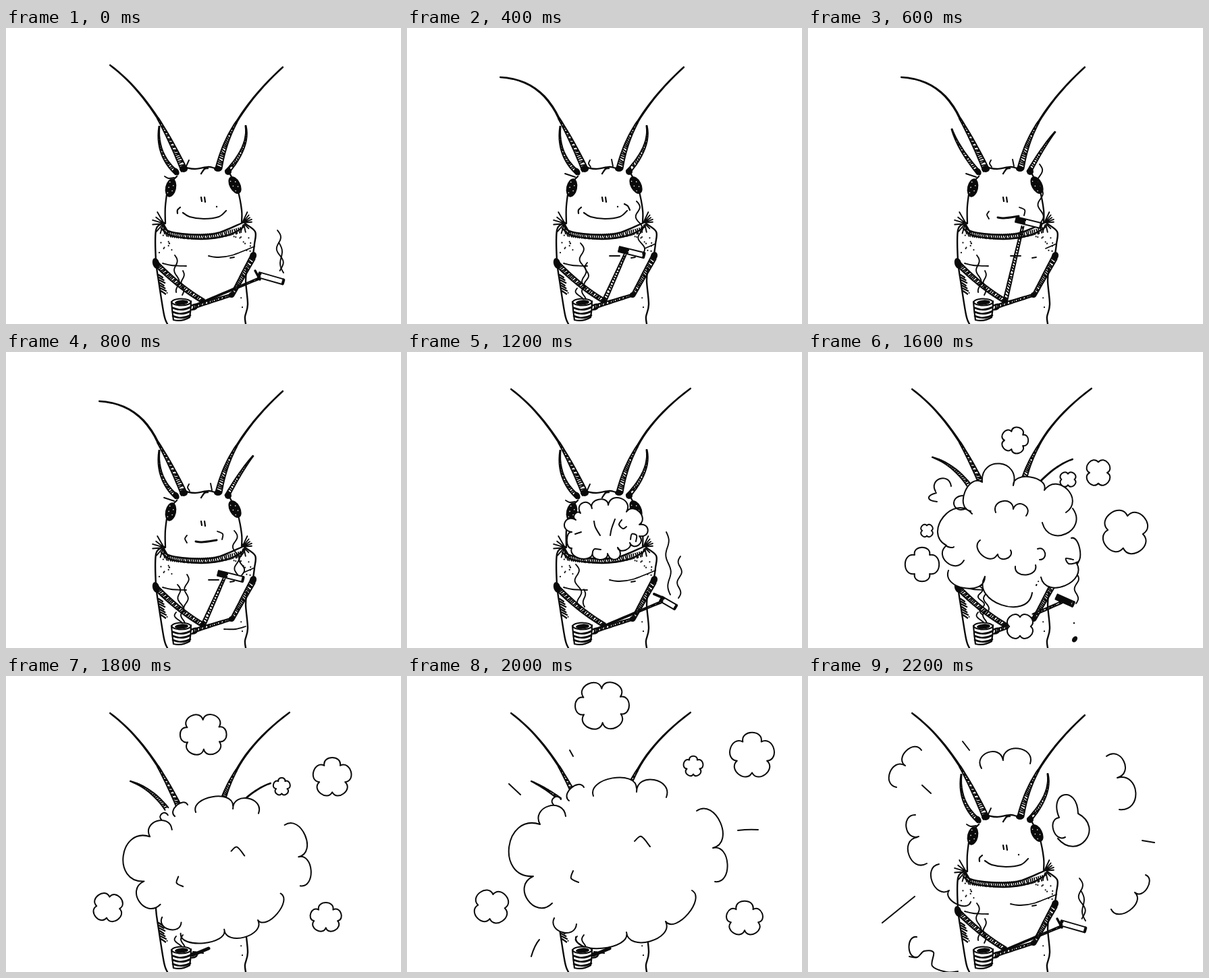
An HTML page for the animation above (2400 ms loop, 585 px wide and 439 px high).

```html
<!DOCTYPE html>
<html lang="en">
<head>
<meta charset="utf-8">
<title>Smoking bug</title>
<style>
  html, body { margin: 0; width: 100%; height: 100%; overflow: hidden; background: #fff; }
  svg { display: block; width: 585px; height: 439px; }
  path { fill: none; stroke: #0a0a0a; stroke-linecap: round; stroke-linejoin: round; vector-effect: non-scaling-stroke; }
  .paper { fill: #fff; stroke: none; }
</style>
</head>
<body>
<svg id="stage" viewBox="0 0 585 439"></svg>
<script>
const STEP = 200;

let seed = 7;
const random = () => (seed = seed * 16807 % 2147483647) / 2147483647;
const range = n => Array.from({ length: n }, (_, i) => i);

// "x,y x,y / x,y ..." -> strokes made of points
const parse = text => text.split('/').map(s => s.trim().split(/\s+/).map(p => p.split(',').map(Number)));
const path = (d, w = 2.2) => `<path d="${d}" stroke-width="${w}"/>`;
const trace = pts => 'M' + pts.map(p => p.map(v => v.toFixed(1))).join('L');
const put = (transform, art) => `<g transform="${transform}">${art}</g>`;
const zoom = (k, x, y, art) => put(`translate(${x} ${y}) scale(${k}) translate(${-x} ${-y})`, art);
const blob = (x, y, rx, ry = rx, turn = 0) =>
  `<ellipse fill="#0a0a0a" cx="${x}" cy="${y}" rx="${rx}" ry="${ry}" transform="rotate(${turn} ${x} ${y})"/>`;

// Smooth curve through every point
function curve(pts) {
  let d = 'M' + pts[0];
  for (let i = 0; i < pts.length - 1; i++) {
    const a = pts[i], b = pts[i + 1], before = pts[i - 1] || a, after = pts[i + 2] || b;
    const c1 = a.map((v, k) => v + (b[k] - before[k]) / 6);
    const c2 = b.map((v, k) => v - (after[k] - a[k]) / 6);
    d += `C${c1} ${c2} ${b}`;
  }
  return d;
}
const ink = (text, w) => path(parse(text).map(curve).join(''), w);

// Rounded lobes between corner points; a third value sets how far a lobe swells
function lobes(strokes, link = 'M') {
  return strokes.map((pts, s) => pts.map(([x, y, swell = .5], i) => {
    if (!i) return (s ? link : 'M') + [x, y];
    const [px, py] = pts[i - 1], dx = x - px, dy = y - py, out = swell * 4 / 3, wide = swell * .25;
    return `C${px + dy * out - dx * wide},${py - dx * out - dy * wide} ${x + dy * out + dx * wide},${y - dx * out + dy * wide} ${x},${y}`;
  }).join('')).join('');
}
const bumps = text => path(lobes(parse(text)), 2);
const cloud = text => `<path class="paper" d="${lobes(parse(text), 'L')}Z"/>` + bumps(text);

// Small closed cloud of n even lobes in a w by h box
function puff(x, y, w, h, n, turn = 0) {
  const ring = range(n + 1).map(i => {
    const a = (i / n + turn) * Math.PI * 2;
    return `${x + Math.cos(a) * w / 2.92},${y + Math.sin(a) * h / 2.92}`;
  });
  return cloud(ring.join(' '));
}

// Tapered limb along a bent path, hatched across
function limb(ax, ay, cx, cy, bx, by, w0, w1, gap = 3) {
  const at = (t, side) => {
    const u = 1 - t, x = u * u * ax + 2 * u * t * cx + t * t * bx, y = u * u * ay + 2 * u * t * cy + t * t * by;
    const dx = u * (cx - ax) + t * (bx - cx), dy = u * (cy - ay) + t * (by - cy);
    const off = side * (w0 + (w1 - w0) * t) / 2 / Math.hypot(dx, dy);
    return [x - dy * off, y + dx * off];
  };
  const edge = side => trace(range(13).map(i => at(i / 12, side)));
  const n = Math.floor(Math.hypot(bx - ax, by - ay) / gap);
  const hatch = w1 > 2 ? range(n).map(i => trace([at(i / n, 1), at(Math.min(1, (i + random()) / n), -1)])) : [];
  return path(edge(1) + edge(-1) + hatch.join(''), 2);
}
const bone = (ax, ay, bx, by, w0, w1, gap) => limb(ax, ay, (ax + bx) / 2, (ay + by) / 2, bx, by, w0, w1, gap);

// Wavering line that rises from (x, y) to (x2, y2)
const wisp = (x, y, x2, y2, amp = 4, waves = 2) => path(trace(range(33).map(i => {
  const t = i / 32;
  return [x + (x2 - x) * t + amp * Math.sin(t * waves * Math.PI * 2), y + (y2 - y) * t];
})), 1.9);

const spray = (n, x, y, w, h) => range(n).map(() => blob(x + random() * w, y + random() * h, 1.1)).join('');

// Hairs fanned out from one place
const tuft = (x, y, from, to, n, len) => path(range(n).map(i => {
  const a = (from + (to - from) * i / (n - 1)) * Math.PI / 180, r = len * (.75 + random() * .3);
  return trace([[x + 2 * Math.cos(a), y + 2 * Math.sin(a)], [x + r * Math.cos(a), y + r * Math.sin(a)]]);
}).join(''), 1.9);

const eye = (x, y, turn) => blob(x, y, 8, 14, turn) + put(`translate(${x} ${y}) rotate(${turn})`,
  range(5).map(i => `<circle cx="${i % 2 ? 3 : -3}" cy="${i * 4 - 8}" r=".8" fill="#fff"/>`).join(''));

const cig = (x, y, turn, len, dark) => put(`translate(${x} ${y}) rotate(${turn})`,
  `<path class="paper" d="M0-4h${len}v8H0z"/>` + path(`M0-4h${len}v8H0z`, 2) +
  path(`M1-2h${dark}M1 2h${dark}M${len}-3v6`, 4));

// Body and head
const body =
  ink('231,290 222,300 222,345 226,375 234,425 239,439 / 354,290 369,302 368,320 366,335 / 357,356 355,375 358,410 354,428 355,439', 2.4) +
  path(range(7).map(i => `M${226 + i * .6} ${366 + i * 4}l${6 + i % 3} 4`).join('')) +
  ink('232,349 245,352 267,353 / 332,341 338,340', 1.8) +
  spray(12, 227, 300, 20, 36) + spray(11, 336, 300, 28, 34) + spray(2, 234, 392, 5, 14) + spray(2, 346, 392, 6, 24);
const band = x => 306 - ((x - 280) / 60) ** 2 * 8;
const collar =
  ink('234,289 238,300 270,306 310,305 350,289 / 230,297 245,308 290,313 330,307 352,295', 2.4) +
  path(range(38).map(i => `M${236 + i * 3} ${band(236 + i * 3)}l${1 + random() * 2} 7`).join(''), 1.8) +
  tuft(234, 290, 175, 240, 4, 19) + tuft(233, 290, 60, 130, 4, 15) +
  tuft(350, 289, 295, 355, 5, 18) + tuft(352, 290, 45, 110, 3, 14);
const head =
  ink('267,207 280,209 300,206 309,208 / 289,216 294,209 299,208 / 253,220 241,235 236,264 236,290 / 331,215 343,240 349,270 349,288', 2.3) +
  eye(244, 237, 12) + eye(339, 233, -28) + path('M289 251l1 6M294 251l1 7') +
  blob(252, 213, 4, 6, -30) + blob(263, 209, 6, 5) + blob(314, 209, 6, 4) + blob(329, 213, 5, 5);
const bug = body + collar + head;
const chest = ink('300,338 315,340 335,337 368,324', 1.8);
const chestCut = ink('300,338 315,338 / 352,327 368,320', 1.8);
const tuftA = ink('266,207 271,196 / 235,220 241,223 249,222 / 332,206 341,199', 1.9);
const tuftB = ink('272,206 269,201 271,196 / 234,216 249,221 / 303,195 305,205', 1.9);

const smile = ink('262,274 272,280 293,283 315,280 326,271 / 258,266 254,270 254,275');
const mouthDot = blob(312, 265, 1.2);
const smirk = ink('322,261 327,264 330,270');
const flat = ink('281,281 290,282 312,279', 3) + ink('268,272 265,277 268,283 / 313,266 321,270 320,278', 1.9);

// Antennae
const feelL = limb(225, 134, 246, 170, 264, 211, 2, 9);
const feelR = limb(341, 140, 323, 170, 315, 208, 2, 9);
const tipL = limb(154, 55, 192, 83, 225, 134, .5, 1.5) + feelL;
const bentL = limb(138, 73, 198, 76, 225, 134, .5, 1.5) + feelL;
const tipR = limb(410, 58, 367, 97, 341, 140, .5, 1.5) + feelR;
const longR = limb(420, 54, 365, 95, 341, 140, .5, 1.5) + feelR;
const earL = limb(227, 146, 222, 188, 253, 215, 1, 6);
const earR = limb(355, 145, 361, 176, 327, 214, 1, 6);
const earLOut = limb(213, 150, 222, 178, 253, 215, 1, 6);
const earROut = limb(366, 154, 348, 176, 327, 214, 1, 6);
const splay = limb(184, 156, 215, 166, 238, 197, .5, 6) + limb(392, 159, 368, 167, 343, 193, .5, 1);
const stubL = limb(184, 156, 207, 167, 227, 183, .5, 4);

// Arms and cup
const arms = blob(222, 349, 5, 8, -15) + limb(223, 350, 255, 383, 292, 405, 7, 6, 2.7) + blob(292, 405, 4, 3) +
  blob(366, 338, 5, 6, 20) + bone(365, 341, 335, 396, 8, 5, 2.7) + blob(334, 396, 4) + bone(334, 396, 276, 414, 3, 5);
const stub = path('M276 414L300 404', 5) + path('M277 409L292 411');
const cup = `<path class="paper" d="M245 406L248 433H272L274 405Z"/>` +
  path('M245 406Q246 420 248 433Q261 436 272 429Q274 418 274 405') +
  path(range(3).map(i => `M247 ${415 + i * 6}q13 6 26-1`).join(''), 2.6) +
  '<ellipse cx="259.500" cy="406.500" rx="14" ry="5" fill="#fff" stroke="#0a0a0a" stroke-width="2"/>' + blob(260, 407, 10, 3.6, -4) +
  path('M274 412q8-5 9 0t-8 6');

const curl = wisp(252, 386, 257, 402, -4, .7) + wisp(262, 384, 262, 402, -3, .7);
const steamA = wisp(250, 337, 255, 392, 3, 1.8) + wisp(262, 360, 261, 396, 2, 1.5);
const steamB = wisp(257, 319, 264, 385, 4, 2) + wisp(267, 348, 265, 387, -3, 1.5) + curl;
const steamC = wisp(254, 345, 261, 387, 3, 1.5) + wisp(268, 330, 266, 387, 3, 2) + curl;
const steamD = wisp(250, 315, 257, 380, 4, 2) + wisp(262, 352, 263, 378, 2, 1);
const steamE = wisp(254, 347, 259, 390, 4, 2) + wisp(264, 343, 264, 388, 4, 1.5) + curl;

// Cigarette
const reach = bone(280, 411, 376, 371, 1.5, 2.5, 8);
const cigA = reach + cig(374, 366, 16, 38, 1) + path('M369 360L376 373', 3.5) +
  wisp(402, 300, 408, 360, 4, 1.6) + wisp(404, 318, 411, 363, 3, 1);
const cigD = reach + cig(376, 366, 30, 25, 2) + path('M366 359L380 365', 4) +
  wisp(384, 267, 390, 360, 3, 2) + wisp(405, 303, 402, 365, -3, 2);
const bend = bone(292, 405, 323, 336, 6, 3, 4);
const cigB = cig(314, 328, 14, 38, 12);
const smokeB = wisp(340, 257, 349, 335, 4, 2.5);
const smokeC = wisp(338, 265, 343, 330, 4, 2) + wisp(350, 285, 349, 331, 4, 1.5);
const drag = bone(292, 405, 318, 294, 6, 3, 4) + put('translate(-6 -44)', cigB) + wisp(343, 202, 345, 288, 4, 2.5);
const cigE = bone(333, 390, 376, 371, 3, 3, 5) + cig(368, 363, 24, 27, 22) + wisp(399, 300, 397, 373, 3, 2.5);
const drops = blob(395, 426, 3.5, 5, 35) + spray(3, 336, 340, 12, 8) + blob(394, 402, 1.2);

// Smoke
const faceSmoke =
  cloud('244,267 250,249,.75 257,239,.5 274,232,.7 298,227,.45 325,237,.55 344,256,.5 344,273,.75 330,283,.6 312,290,.4 297,299,.8 275,297,.45 244,291,.4 244,267,.3') +
  ink('277,251 279,260 286,272 / 308,248 303,262 301,272 / 249,270 258,267 / 275,296 278,292 287,293 / 318,249 314,256 320,262 325,259 / 331,278 333,270 340,272 339,281', 2);
const breath = puff(292, 278, 38, 28, 5);

const bigCloud =
  cloud('262,333 208,324,.4 / 231,309 205,287,.55 / 216,289 205,287,.15 243,240,.5 / 241,236 258,193,.4 304,198,.65 350,205,.35 382,238,.55 / 392,232 347,253,.6 / 390,276 397,312,.25 345,334,.45 / 332,357 262,333,.43') +
  bumps('278,238 304,233,.55 323,243,.6 / 280,301 255,279,.45 / 300,294 281,300,.5 / 337,316 307,318,.45 / 340,292 343,308,.6 / 234,232 229,213,.8') +
  ink('396,313 386,314 382,306 393,308', 2);
const nearPuffs = puff(306, 131, 44, 40, 5, .1) + puff(430, 179, 38, 46, 4) + puff(385, 189, 28, 24, 4) +
  puff(176, 265, 20, 22, 4) + puff(169, 315, 46, 58, 4, .125) + bumps('190,209 191,222,-.9 / 189,207 212,199,.65');
const sidePuff = puff(470, 267, 76, 70, 4, .02);
const handCloud = puff(314, 407, 46, 40, 4);

const hugeCloud =
  cloud('197,220 235,208,.55 / 217,191 228,183,.6 / 240,185 262,165,.4 / 276,178 340,167,.33 / 340,172 384,180,.5 / 429,200 453,255,.42 456,305,.4 / 422,318 383,364,.3 325,380,.37 250,387,.27 / 251,368 218,359,.5 / 215,337 187,297,.55 197,220,.53') +
  ink('337,245 347,238 360,253 / 246,289 243,300 254,306', 2);
const farPuffs = puff(289, 44, 92, 74, 6, .08) + puff(511, 118, 68, 74, 5, .05) + puff(424, 134, 29, 34, 5, .05) +
  puff(500, 360, 62, 50, 5, .05) + puff(125, 342, 58, 53, 4, .02);
const burst = path('M241 110l5 9M151 160l17 16M490 229q16-2 30-1M196 391q-7 8-12 25', 2);
const remains =
  bumps('131,165 144,133 168,110,.45 / 257,137 289,125,.55 329,130 / 442,119 458,151,.55 461,198,.55 / 381,239 372,210,.45 400,204,1.1 370,241,.7 / 500,295 484,321,.4 449,346,.4 / 176,278 162,239 / 164,238 159,206 / 241,335 209,318,.35 194,279,.45 / 162,417 161,387,.4') +
  ink('150,416 162,417 172,408 186,410 184,430 205,439 222,438', 2) +
  path('M229 97l10 13M169 162l13 12M495 244l18 3M110 366L158 327', 2);

const idle = [bug, chest, tuftA, tipL, tipR, earL, earR, smile, mouthDot, arms, steamA, cup, cigA];
const bent = [bentL, tipR, arms, cup];
const chestUp = [bug, chestCut, tuftB, ...bent];
const blown = [bug, chest, tuftA, tipL, longR, arms, cup, cigD];
const late = [body, tipL, longR];

const poses = [
  idle,
  [bug, chest, tuftA, ...bent, earL, earR, smile, mouthDot, steamB, put('rotate(-6 292 405)', cigA)],
  [...chestUp, earL, earR, smile, mouthDot, smirk, steamB, bend, cigB, smokeB],
  [...chestUp, earLOut, earROut, flat, steamA, drag],
  [...chestUp, earL, earROut, flat, ink('323,411 340,411 355,407', 1.8), steamC, bend, cigB, smokeC],
  [...blown, earL, earR, steamA, breath],
  [...blown, earL, earR, steamD, faceSmoke],
  [...blown, splay, steamE, zoom(.85, 290, 265, bigCloud + nearPuffs)],
  [...late, splay, arms, steamE, cigE, bigCloud, nearPuffs, sidePuff, cup, handCloud, drops],
  [...late, splay, zoom(.86, 312, 350, hugeCloud + farPuffs), stub, curl, cup],
  [...late, stubL, hugeCloud, farPuffs, burst, stub, curl, cup],
  [...idle, remains]
];

const stage = document.getElementById('stage');
stage.innerHTML = poses.map(p => `<g display="none">${p.join('')}</g>`).join('');
const layers = [...stage.children];
const begin = performance.now();

function tick() {
  const now = Math.floor((performance.now() - begin) / STEP) % poses.length;
  layers.forEach((g, i) => g.setAttribute('display', i === now ? 'inline' : 'none'));
  requestAnimationFrame(tick);
}
tick();
</script>
</body>
</html>
```
